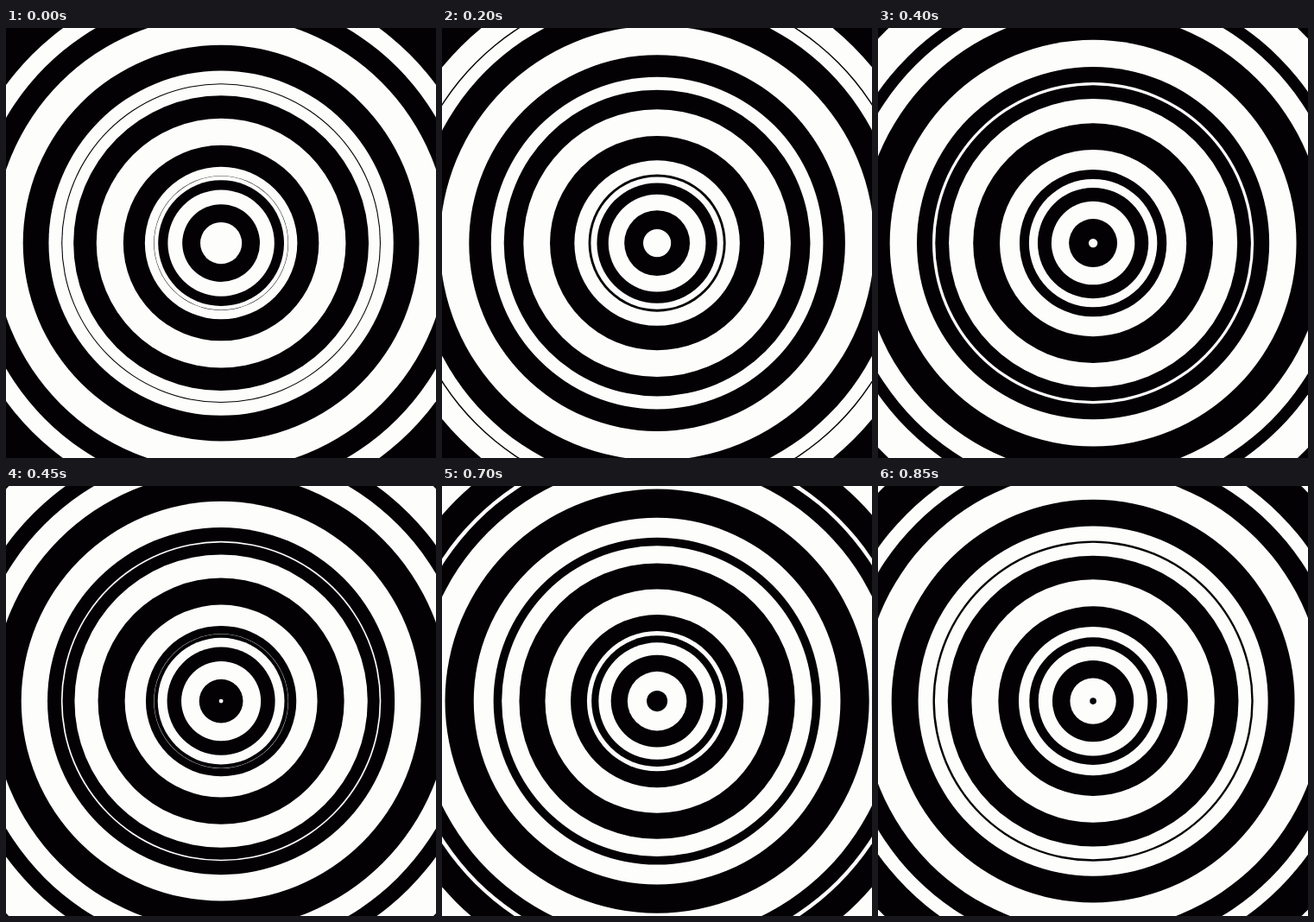
Write an HTML page with a canvas that moves like this. It is 498x498 px and loops after 0.9 s.

```html
<!DOCTYPE html>
<html>
<head>
<meta charset="utf-8">
<style>
  html, body { margin: 0; width: 100%; height: 100%; overflow: hidden; background: #fdfefc; }
  canvas { display: block; }
</style>
</head>
<body>
<canvas id="stage" width="498" height="498"></canvas>
<script>
const ctx = document.getElementById('stage').getContext('2d');
const LOOP = 900, STEP = 50, CENTER = 249.1;
const COLORS = ['#fdfefc', '#030104'];

// Each zone maps a stripe number n in [min, max] to a radius:
// mid + amp * cos((n - start) * degrees)
const zones = [
  { mid: 0, amp: 77.6, start: -0.09, degrees: 17.3, min: 0, max: 5.11 },
  { mid: 131.1, amp: -53.2, start: 0, degrees: 34.05, min: 0, max: 5.286 },
  { mid: 240.1, amp: 55.7, start: 0.22, degrees: 35.5, min: 0.22, max: 5.286 },
  { mid: 401.1, amp: -105, start: 0.22, degrees: 34, min: 0.22, max: 2.8 }
];

function edgeRadii(phase) {
  const radii = [];
  for (const { mid, amp, start, degrees, min, max } of zones) {
    for (let n = phase + Math.ceil(min - phase); n < max; n++) {
      radii.push(mid + amp * Math.cos((n - start) * degrees * Math.PI / 180));
    }
  }
  return radii.sort((a, b) => b - a);
}

function draw(time) {
  // The first pose is held for two steps
  const step = Math.floor(time % LOOP / STEP);
  const phase = 0.067 + Math.max(0, step - 1) * 2 / 17;
  let color = Math.abs(Math.floor(zones[3].max - phase)) % 2;

  ctx.fillStyle = COLORS[color];
  ctx.fillRect(0, 0, 498, 498);
  for (const radius of edgeRadii(phase)) {
    color = 1 - color;
    if (radius < 1.5) continue;
    ctx.fillStyle = COLORS[color];
    ctx.beginPath();
    ctx.arc(CENTER, CENTER, radius, 0, 2 * Math.PI);
    ctx.fill();
  }
}

const origin = performance.now();
function tick() {
  draw(performance.now() - origin);
  requestAnimationFrame(tick);
}
tick();
</script>
</body>
</html>
```
